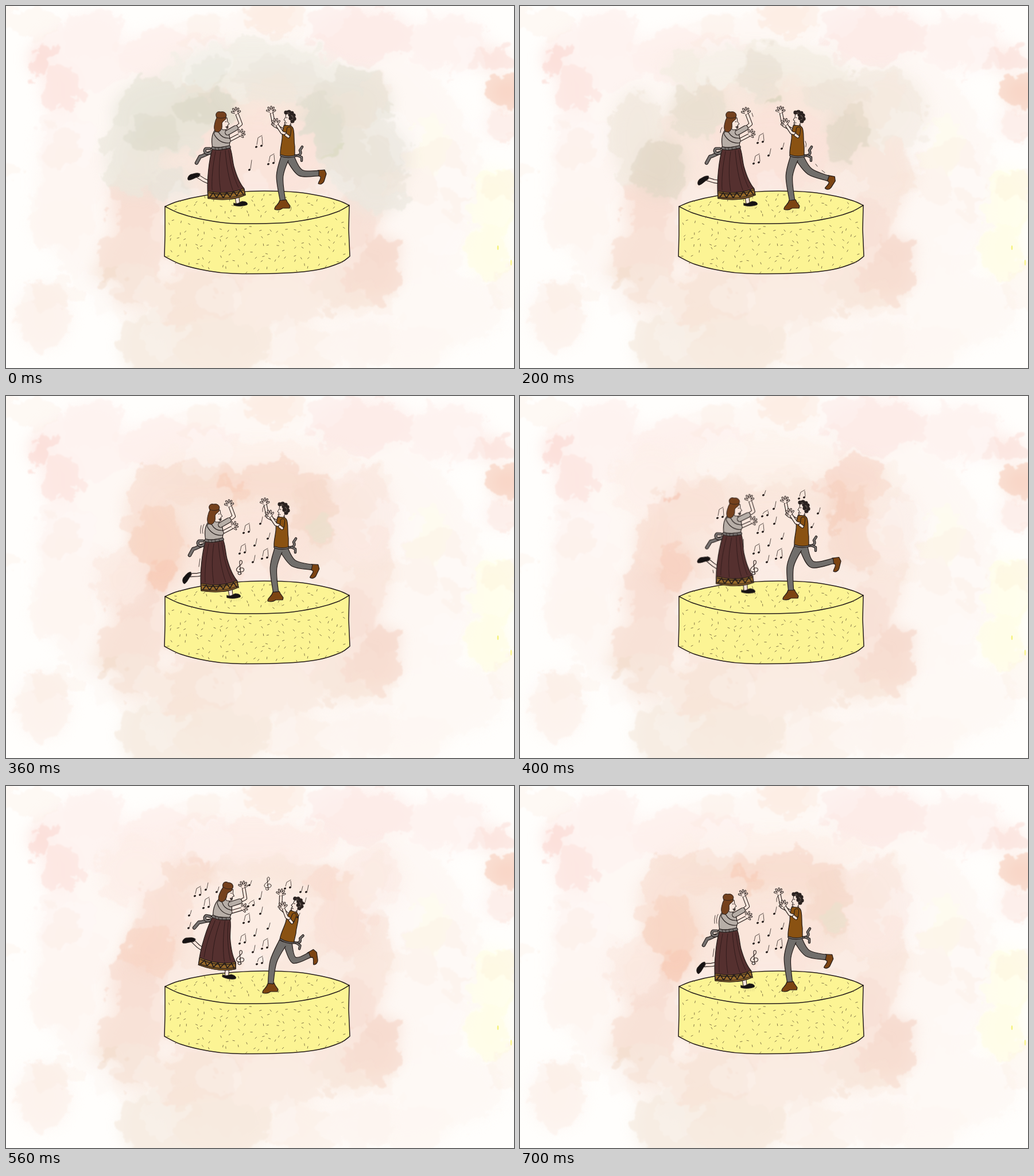
These frames come from a looping animation (885 by 632 pixels, 0.8 s). An HTML page:

```html
<!DOCTYPE html>
<html lang="en">
<head>
<meta charset="utf-8">
<title>Dancing on a cake</title>
<style>
  html, body { margin: 0; width: 100%; height: 100%; overflow: hidden; background: #fffefc; }
  svg { display: block; width: 100vw; height: 100vh; }
  .pose { opacity: 0; animation: 800ms step-end infinite; }
  .p0 { animation-name: p0; }
  .p1 { animation-name: p1; }
  .p2 { animation-name: p2; }
  .p3 { animation-name: p3; }
  .p4 { animation-name: p4; }
  @keyframes p0 { 0% { opacity: 1 } 25%, 100% { opacity: 0 } }
  @keyframes p1 { 0% { opacity: 0 } 25% { opacity: 1 } 37.5%, 100% { opacity: 0 } }
  @keyframes p2 { 0% { opacity: 0 } 37.5% { opacity: 1 } 50% { opacity: 0 } 87.5%, 100% { opacity: 1 } }
  @keyframes p3 { 0% { opacity: 0 } 50% { opacity: 1 } 62.5% { opacity: 0 } 75% { opacity: 1 } 87.5%, 100% { opacity: 0 } }
  @keyframes p4 { 0% { opacity: 0 } 62.5% { opacity: 1 } 75%, 100% { opacity: 0 } }
</style>
</head>
<body>
<svg id="stage" viewBox="0 0 885 632" preserveAspectRatio="none" stroke-linecap="round" stroke-linejoin="round"></svg>
<script>
const INK = '#241c1a', SKIN = '#fbe6dc', GREY = '#b7aea7', RIBBON = '#777270',
      TROUSER = '#716e6b', SHIRT = '#8a5212', BOOT = '#7c4412', HAIR = '#75411d';

let seed = 11;
const rnd = () => (seed = (seed * 16807) % 2147483647) / 2147483647;
const spread = size => (rnd() - 0.5) * size;
const group = (body, attrs = '') => `<g ${attrs}>${body}</g>`;
const shape = (d, fill, w = 1.2) => `<path d="${d}" fill="${fill}" stroke="${INK}" stroke-width="${w}"/>`;
const line = (d, w = 1, color = INK) => `<path d="${d}" fill="none" stroke="${color}" stroke-width="${w}"/>`;
const limb = (d, w, fill) => line(d, w + 2.2) + line(d, w, fill);
const oval = (x, y, rx, ry, fill, turn = 0) =>
  `<ellipse cx="${x}" cy="${y}" rx="${rx}" ry="${ry}" fill="${fill}" transform="rotate(${turn} ${x} ${y})"/>`;

// Smooth path through points.
const curve = pts => pts.slice(1).reduce((d, p, i) => {
  const a = pts[i], before = pts[i - 1] || a, after = pts[i + 2] || p;
  const c = [a[0] + (p[0] - before[0]) / 6, a[1] + (p[1] - before[1]) / 6,
             p[0] - (after[0] - a[0]) / 6, p[1] - (after[1] - a[1]) / 6, ...p];
  return d + `C${c.map(v => v.toFixed(1)).join(' ')}`;
}, `${pts[0].join(' ')}`);

// Trouser leg tapering from hip over knee to ankle.
const leg = (hip, knee, ankle) => {
  const aim = (a, b) => Math.atan2(b[1] - a[1], b[0] - a[0]);
  const joints = [[hip, aim(hip, knee), 7.5], [knee, aim(hip, ankle), 5.8], [ankle, aim(knee, ankle), 4.6]];
  const side = s => joints.map(([p, a, w]) => [p[0] - s * w * Math.sin(a), p[1] + s * w * Math.cos(a)]);
  return shape(`M${curve(side(1))}L${curve(side(-1).reverse())}Z`, TROUSER);
};

// Watercolour: every blob is a blurred stain plus a ragged-edged patch.
const wash = blobs => {
  const body = blobs.map(([color, x, y, rx, ry]) => oval(x, y, rx, ry, color)).join('');
  return group(body, 'filter="url(#soft)" opacity=".65"') + group(body, 'filter="url(#ragged)" opacity=".65"');
};

const paper = [
  ['#fef8f4', 440, 310, 390, 300], ['#fef3f0', 130, 90, 85, 60], ['#fef2ef', 150, 50, 55, 40],
  ['#fcdcd6', 60, 92, 20, 28], ['#fde5e0', 95, 150, 32, 45], ['#fef5f2', 110, 235, 55, 50],
  ['#fef5f1', 115, 305, 60, 55], ['#fef5f0', 100, 380, 55, 42], ['#fdf2ec', 65, 540, 48, 58],
  ['#fef0ec', 300, 90, 110, 50], ['#fdeae6', 620, 50, 90, 50], ['#fdece2', 470, 18, 55, 28],
  ['#fef2ef', 770, 65, 70, 50], ['#fce3dd', 845, 92, 36, 22], ['#f8d1c0', 874, 150, 32, 24],
  ['#fde9e3', 862, 205, 30, 25], ['#fefbee', 740, 245, 30, 55], ['#fffee6', 850, 345, 36, 60],
  ['#fffde6', 842, 430, 36, 45], ['#fef9f5', 770, 530, 100, 65], ['#fef7f2', 700, 590, 80, 40]
];
const lower = [
  ['#fae6dc', 440, 310, 230, 195], ['#f8dcd0', 222, 350, 42, 60], ['#f8e0d4', 215, 440, 52, 52],
  ['#f7e4d8', 225, 490, 45, 40], ['#f6ebe0', 275, 595, 75, 66], ['#f7e9dd', 375, 585, 88, 70],
  ['#f8e4d7', 330, 510, 85, 45], ['#f3dccb', 172, 467, 24, 12], ['#faebe1', 470, 520, 75, 45],
  ['#fcf1e9', 510, 600, 55, 45], ['#f8e6da', 580, 495, 50, 40], ['#f7dbce', 640, 468, 46, 42],
  ['#f6d8cb', 650, 425, 40, 22], ['#f8dfd4', 612, 380, 28, 40], ['#fdf5f0', 610, 595, 60, 40]
];

const moods = [
  [['#f1eee5', 430, 110, 150, 46], ['#e7e4d8', 280, 190, 95, 65], ['#ebe7dc', 222, 265, 50, 65],
   ['#dedccd', 260, 225, 48, 30], ['#e5e4d8', 355, 122, 35, 32], ['#dbd9c9', 350, 180, 55, 28],
   ['#ece8de', 480, 130, 75, 38], ['#e6e2d6', 600, 170, 72, 58], ['#e9e4da', 630, 265, 75, 68],
   ['#dedccd', 545, 215, 42, 50], ['#ebe7de', 645, 330, 45, 32], ['#d7d9bf', 572, 255, 12, 6],
   ['#e8e3d9', 285, 310, 40, 28], ['#fae3da', 440, 265, 112, 75]],
  [['#f3ede2', 410, 108, 160, 36], ['#f1e8dd', 205, 230, 45, 85], ['#f3eae0', 630, 185, 80, 75],
   ['#e8dfd0', 310, 180, 52, 45], ['#e2d8c7', 245, 280, 44, 52], ['#eae2d5', 420, 118, 35, 40],
   ['#ede4d8', 550, 150, 55, 32], ['#e2d8c7', 572, 225, 38, 50], ['#f8e7dd', 630, 290, 60, 50],
   ['#cdcdb4', 440, 163, 16, 5], ['#fae2d9', 435, 250, 105, 72]],
  [['#fdf0e9', 440, 110, 170, 28], ['#f8dfd2', 325, 150, 95, 38], ['#f9e0d4', 240, 200, 34, 48],
   ['#f7d4c2', 265, 260, 48, 65], ['#f7cab5', 272, 310, 28, 26], ['#f8dccf', 470, 150, 90, 33],
   ['#f7cdb9', 402, 160, 22, 15], ['#f5d9ca', 535, 210, 42, 55], ['#eadeca', 545, 235, 20, 18],
   ['#fbe9e2', 620, 210, 55, 85], ['#fbeae2', 200, 320, 42, 48], ['#fae4da', 425, 265, 100, 75]],
  [['#fdf3ec', 430, 112, 150, 38], ['#fdf0ea', 230, 150, 65, 60], ['#f9e2d7', 300, 190, 58, 45],
   ['#f9dfd3', 240, 255, 40, 55], ['#f7d0bf', 270, 300, 36, 38], ['#f6c6b4', 262, 175, 12, 8],
   ['#f8d9cc', 580, 145, 55, 40], ['#f5cfbd', 570, 205, 36, 42], ['#f7dccf', 590, 260, 44, 45],
   ['#fbece5', 650, 230, 45, 70], ['#fbe8df', 435, 245, 105, 75]],
  [['#fdece6', 430, 98, 150, 32], ['#fdeee8', 230, 150, 65, 60], ['#f8ded1', 320, 148, 46, 26],
   ['#f6d0c0', 342, 135, 16, 11], ['#f9e0d5', 280, 220, 45, 55], ['#f8d5c5', 255, 285, 46, 42],
   ['#f9ddd1', 570, 175, 36, 34], ['#f9e1d7', 590, 240, 48, 55], ['#fcece6', 640, 160, 48, 60],
   ['#fcece4', 430, 230, 110, 75]]
];

const mottle = () => {
  let blobs = '';
  for (let i = 0; i < 45; i++)
    blobs += oval(rnd() * 885, rnd() * 632, 22 + rnd() * 30, 20 + rnd() * 26, i % 2 ? '#fff' : '#fae5d8');
  return group(blobs, 'filter="url(#ragged)" opacity=".2"');
};

const cake = () => {
  const back = curve([[277, 350], [300, 341], [345, 331], [400, 325], [450, 323], [505, 325], [550, 332], [580, 340], [598, 348]]);
  const front = curve([[277, 350], [300, 361], [335, 371], [385, 379], [430, 380], [490, 378], [545, 369], [578, 359], [598, 348]]);
  const base = curve([[599, 437], [583, 448], [545, 460], [490, 466], [395, 467], [350, 462], [305, 451], [276, 437]]);
  let d = '';
  const dash = (x, y) => {
    const a = rnd() * Math.PI, u = 1.7 * Math.cos(a), v = 1.7 * Math.sin(a);
    d += `M${(x - u).toFixed(1)} ${(y - v).toFixed(1)}l${(2 * u).toFixed(1)} ${(2 * v).toFixed(1)}`;
  };
  for (let col = 0; col < 22; col++) {
    const x = 287 + col * 14.3, edge = 352 + 28 * Math.sqrt(1 - ((x - 438) / 161) ** 2);
    for (let row = 0; row < 6; row++) dash(x + spread(11), edge + 8 + row * 13.5 + (col % 2) * 6 + spread(9));
  }
  for (let y = 332; y < 376; y += 9) {
    const half = 148 * Math.sqrt(1 - ((y - 352) / 26) ** 2);
    for (let x = 440 - half; x < 438 + half; x += 20) dash(x + spread(12), y + spread(7));
  }
  return shape(`M${back}L597 390L${base}L277 400Z`, '#fcf494', 1.5) + line(`M${front}`, 1.5) + line(d, 0.9, '#75683f');
};

const hand = (x, y, turn) => {
  const fingers = 'M0 0L-7 -3M0 0L-4 -8M0 0L1 -9M0 0L5 -7M0 1L7 -2';
  return group(line(fingers, 3.4) + line(fingers, 1.4, SKIN) + oval(0, 0, 2.4, 2.4, SKIN),
    `transform="translate(${x} ${y}) rotate(${turn})"`);
};

const woman = (move, kick) => {
  let zigzag = 'M355 334';
  for (let i = 1; i < 11; i++) zigzag += `L${355 + i * 5.9} ${(i % 2 ? 326 : 335) - Math.max(0, i - 4) * 0.9}`;
  const backLeg = limb('M354 308 L345 304 L334 297', 4.6, SKIN)
    + shape('M338 293 C333 290 327 293 322 294 C317 296 315 303 318 304 C324 304 330 299 336 298Z', '#171313', 0.8);
  return group(
    group(backLeg, `transform="rotate(${kick} 352 305)"`)
    + limb('M402 330 L404 344', 5.4, SKIN)
    + shape('M397 344 C402 347 407 343 411 341 C418 341 422 344 420 347 C413 350 402 350 397 348Z', '#171313', 0.8)
    + limb('M359 256 C350 256 345 262 338 263 L332 274', 4.2, RIBBON)
    + limb('M358 254 C352 262 342 255 348 249 L355 249', 3, RIBBON)
    + shape('M360 248 L389 245 C394 252 394 268 397 280 C402 298 408 311 415 319 L417 330 C396 340 372 339 352 336 C349 306 354 266 360 248Z', '#55302f')
    + shape('M352 323 C375 328 398 326 414 318 L417 330 C396 340 372 339 352 336Z', '#96692a', 1.1)
    + line(zigzag, 1.7) + line('M354 326 C376 331 398 328 414 321 M353 334 C376 337 398 335 416 328', 1.3)
    + line('M365 254 C360 280 358 302 359 321 M374 254 C370 282 371 304 374 323 M382 252 C384 278 388 302 395 321 M388 252 C391 278 397 300 405 317', 0.9, '#2f1a1a')
    + shape('M367 213 C359 221 357 234 360 248 L389 245 C391 234 390 226 387 220 L378 213Z', GREY)
    + limb('M360 248 C370 251 380 248 389 246', 3.4, RIBBON)
    + line('M364 247l1 4M370 248l1 4M376 247l1 4M383 246l1 4', 0.8)
    + limb('M398 215 L409 206 L403 190', 4.2, SKIN) + hand(401, 187, -10)
    + limb('M386 221 L400 213', 7.4, GREY)
    + limb('M386 236 L405 226', 4.2, SKIN) + hand(407, 224, 55)
    + limb('M367 223 C371 230 378 235 387 235', 7.4, GREY)
    + shape('M374 197 L385 195 L386 202 L389 206 L386 208 L387 213 L383 216 L377 216 L372 208Z', SKIN, 1)
    + shape('M367 195 C363 187 369 183 374 185 C381 183 386 189 383 194 C385 198 379 200 377 203 C375 206 378 211 375 215 C373 220 368 222 364 218 C361 212 364 204 365 200Z', HAIR, 1)
    + line('M367 194C372 197 378 196 383 194', 0.8) + line('M382 202l2 0', 1) + line('M383 211l4 -1l-2 3z', 1.2),
    `transform="${move}"`);
};

const man = ({ lean, hip, stand, back, boot }) => {
  const [x, y] = hip, [heel, ankle] = [back[1], stand[1]];
  const curls = [[488, 186], [493, 185], [498, 187], [501, 191], [502, 197], [499, 201], [496, 196], [495, 190]]
    .map(([u, v]) => oval(u, v, 3.6, 3.4, '#2b2220')).join('');
  return group(shape('M-2 -5 L10 -6 L13 1 L9 14 C7 19 2 20 -1 18 C0 13 4 11 3 6 L-2 4Z', BOOT), `transform="translate(${heel}) rotate(${boot})"`)
    + leg([x + 8, y - 1], ...back)
    + group(shape('M-5 0 L6 -1 L8 3 L13 10 L12 14 L0 14 C-5 18 -12 17 -14 16 C-15 10 -7 9 -5 0Z', BOOT), `transform="translate(${ankle})"`)
    + leg([x, y - 4], ...stand)
    + line(`M${x - 2} ${y} L${x + 10} ${y}`, 7, TROUSER)
    + group(
      limb('M503 261 C510 262 516 259 512 252 L516 246', 2.4, RIBBON) + limb('M508 261 L515 264 L515 270', 2.2, RIBBON)
      + limb('M484 217 L467 208 L463 188', 3.8, SKIN) + hand(462, 185, -6)
      + shape('M485 207 L496 206 L497 213 L486 212Z', SKIN, 1)
      + shape('M484 209 C492 206 500 209 501 217 C503 228 501 234 503 245 L503 261 C494 264 486 263 478 260 C477 246 483 234 481 222Z', SHIRT)
      + limb('M479 261 C487 264 495 264 503 262', 1.4, RIBBON)
      + limb('M493 225 L481 221 L473 209', 3.8, SKIN) + hand(471, 206, -28)
      + limb('M493 215 L492 223', 6.4, SHIRT) + limb('M492 228 L488 225', 3.6, SKIN)
      + shape('M488 188 L495 188 L497 203 L494 209 L487 208 L485 204 L487 201 L484 199 L487 194Z', SKIN, 1)
      + curls + line('M488 195l2 0M486 204l3 0', 1)
      + line('M490 187q2 -2 4 1M497 191q3 0 3 4M497 199q2 0 3 -2', 0.8, '#8a7a70'),
      `transform="${lean}"`);
};

// Notes: one or two heads with stems, or a clef.
const note = ([kind, x, y, h]) => {
  const head = (u, v) => oval(u, v, 2.2, 1.6, INK, -30);
  if (kind === 'one') return head(x, y) + line(`M${x + 2} ${y - 2} L${x + 4} ${y - h}`, 0.75);
  if (kind === 'two') return head(x, y) + head(x + 9, y - 2)
    + line(`M${x + 1} ${y - 4} L${x + 3} ${y - h} L${x + 10} ${y - h - 4} M${x + 10} ${y - h - 2} L${x + 11} ${y - 4}`, 0.75);
  return group(line('M2 9C-1 13 -5 10 -3 7M1 10L-1 -9C-1 -13 4 -13 3 -8C2 -4 -6 -1 -6 3C-6 8 6 8 6 3C6 -1 -1 -1 -1 3', 1),
    `transform="translate(${x} ${y}) scale(${h / 22})"`);
};
const added = [
  [['two', 436, 246, 16], ['two', 457, 276, 14], ['one', 424, 286, 17]],
  [['two', 414, 239, 13], ['two', 407, 275, 13], ['one', 433, 261, 12], ['one', 456, 249, 10]],
  [['one', 430, 290, 12], ['two', 446, 284, 14], ['clef', 408, 300, 24], ['one', 443, 223, 12]],
  [['two', 422, 210, 7], ['one', 424, 173, 8], ['one', 442, 197, 13], ['two', 344, 213, 15],
   ['two', 486, 179, 11], ['one', 519, 205, 10], ['one', 508, 229, 7]],
  [['two', 329, 192, 13], ['one', 348, 181, 12], ['one', 367, 185, 9], ['one', 319, 226, 9], ['one', 318, 248, 10],
   ['clef', 456, 171, 22], ['two', 437, 311, 10], ['one', 513, 185, 10], ['one', 523, 185, 12]]
];
const notes = i => (i ? added.slice(1, i + 1).flat() : added[0]).map(note).join('');

// Legs are given as knee and ankle.
const poses = [
  { her: '', kick: 0, lean: '', hip: [487, 266], stand: [[477, 297], [482, 339]], back: [[513, 291], [545, 292]], boot: 0,
    ticks: '', shade: '' },
  { her: 'translate(-7 0)', kick: -15, lean: 'translate(-8 0)', hip: [479, 266], stand: [[469, 297], [474, 339]],
    back: [[505, 289], [537, 301]], boot: 15, shade: 'M393 352h18M462 359h20',
    ticks: 'M352 212q-3 4 -3 9M404 187l2 6M497 236q3 5 1 10M515 276l3 4M526 287l5 4' },
  { her: 'translate(-12 4)', kick: -35, lean: 'translate(-11 3)', hip: [476, 269], stand: [[466, 300], [470, 342]],
    back: [[501, 292], [533, 299]], boot: 8, shade: 'M389 356h20M458 364h24',
    ticks: 'M345 224q-4 8 -2 16M340 226q-2 8 -1 14M338 284l-2 14M449 192q-3 5 -2 10' },
  { her: 'translate(-5 -7) rotate(3.5 372 250)', kick: 4, lean: '', hip: [486, 266], stand: [[471, 297], [472, 339]],
    back: [[509, 294], [546, 288]], boot: -3, shade: 'M398 346h18M455 357h14',
    ticks: 'M389 250l0 14M326 280l4 2M336 304l1 5' },
  { her: 'translate(0 -18) rotate(11.5 372 250)', kick: 0, lean: 'translate(-1 9) rotate(13 490 260)', hip: [483, 276],
    stand: [[466, 306], [461, 345]], back: [[502, 304], [529, 295]], boot: -25, shade: 'M384 340h14M444 363h20', ticks: '' }
];

const region = 'filterUnits="userSpaceOnUse" x="-60" y="-60" width="1005" height="752" color-interpolation-filters="sRGB"';
const filters = `<defs>
  <filter id="soft" ${region}><feGaussianBlur stdDeviation="13"/></filter>
  <filter id="ragged" ${region}>
    <feTurbulence type="fractalNoise" baseFrequency=".028" numOctaves="5" seed="4" result="n"/>
    <feDisplacementMap in="SourceGraphic" in2="n" scale="62" xChannelSelector="R" yChannelSelector="G"/>
    <feGaussianBlur stdDeviation=".9"/></filter>
</defs>`;

const layer = draw => poses.map((p, i) => group(draw(p, i), `class="pose p${i}"`)).join('');

document.getElementById('stage').innerHTML = filters
  + wash(paper) + wash(lower)
  + layer((p, i) => wash(moods[i]))
  + mottle()
  + oval(857, 422, 1.3, 4, '#f5f27a') + oval(880, 448, 1.3, 5, '#f9f58c')
  + cake()
  + layer((p, i) =>
      `<path d="${p.shade}" stroke="#b3a96b" stroke-width="5" stroke-dasharray=".6 2.4" stroke-linecap="butt" opacity=".45"/>`
      + woman(p.her, p.kick) + man(p) + line(p.ticks, 0.8) + notes(i));
</script>
</body>
</html>
```
